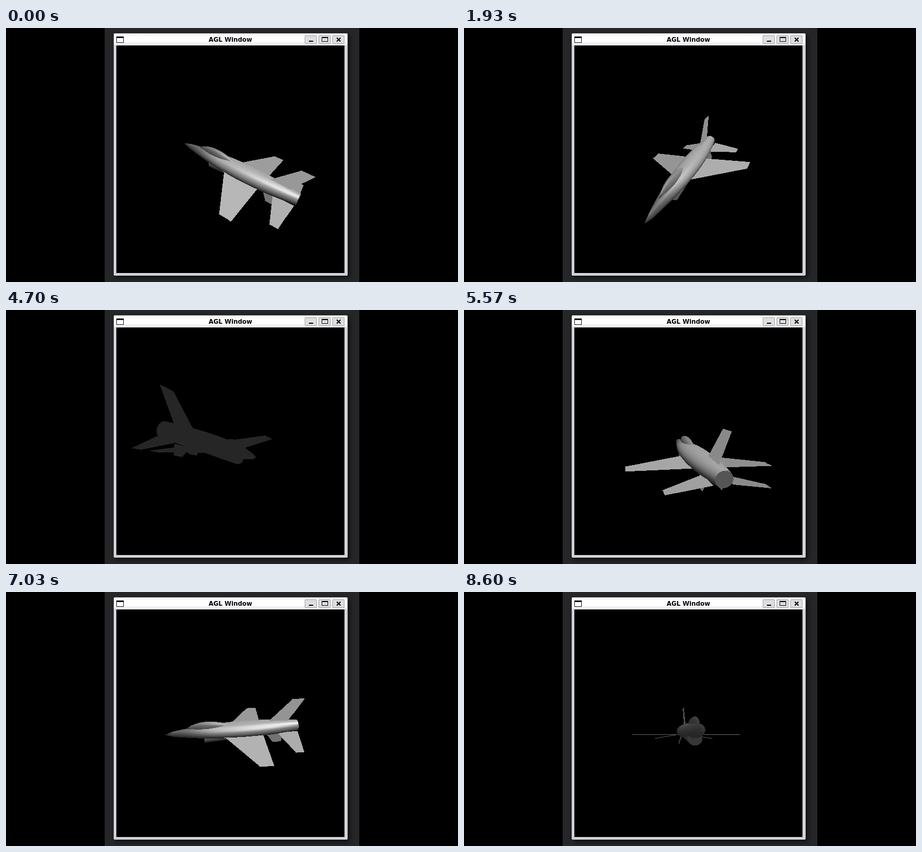
An HTML page with a canvas that plays this animation: 852 px wide and 480 px high, repeating every 8630 ms.

```html
<!DOCTYPE html>
<html lang="en">
<head>
<meta charset="utf-8">
<title>AGL Window</title>
<style>
  html, body { margin: 0; width: 100%; height: 100%; overflow: hidden; background: #000; }
  svg, canvas { position: absolute; display: block; }
  svg { left: 0; top: 0; }
  canvas { left: 208px; top: 33px; }
  text { font: bold 11.6px "DejaVu Sans", sans-serif; }
  .frame { filter: drop-shadow(4px 4px 4px rgba(0, 0, 0, .6)); }
</style>
</head>
<body>
<svg width="852" height="480" viewBox="0 0 852 480">
  <defs>
    <linearGradient id="bar" x1="0" y1="0" x2="0" y2="1">
      <stop offset="0" stop-color="#eeeef2"/>
      <stop offset=".25" stop-color="#fff"/>
      <stop offset=".65" stop-color="#fff"/>
      <stop offset="1" stop-color="#e2e2e8"/>
    </linearGradient>
    <g id="button">
      <rect x=".5" y=".5" width="22" height="15" rx="1.5" fill="#dedee0" stroke="#a2a2a6"/>
    </g>
  </defs>
  <rect x="186" width="480" height="480" fill="#262629"/>
  <rect class="frame" x="203" y="10" width="441" height="458" rx="2" fill="#d2d2d8"/>
  <rect x="204" y="11" width="439" height="22" rx="1" fill="url(#bar)"/>
  <rect x="208" y="33" width="430" height="430"/>
  <path d="M208 16h14v12h-14zM209 19v8h12v-8z" fill="#111" fill-rule="evenodd"/>
  <text x="423" y="26" text-anchor="middle">AGL Window</text>
  <use href="#button" x="563" y="14"/>
  <use href="#button" x="589" y="14"/>
  <use href="#button" x="615" y="14"/>
  <path d="M571 24h8v2h-8z"/>
  <path d="M595 17h12v9h-12zM596 19v6h10v-6z" fill-rule="evenodd"/>
  <path d="M623.5 18.5l7 7m0-7l-7 7" stroke="#000" stroke-width="2"/>
</svg>
<canvas id="view" width="430" height="430"></canvas>
<script>
const LOOP = 8630, SIZE = 430, MID = SIZE / 2, EYE = 400, SIDES = 20;
const ctx = document.getElementById('view').getContext('2d');
const image = ctx.createImageData(SIZE, SIZE);
const depth = new Float32Array(SIZE * SIZE);

// Key poses: time, heading in degrees, sideways lean, lean to the viewer
const POSES = [
  [0, -31, .13, .565],
  [1030, 11, -.17, .53],
  [1930, 60, -.19, .5],
  [3570, 172, -.07, -.545],
  [5570, 285, .04, .17],
  [7030, 361, -.06, .48],
  [8600, 457, 0, -.06]
];

const dot = (a, b) => a[0] * b[0] + a[1] * b[1] + a[2] * b[2];
const norm = v => { const l = Math.hypot(...v); return v.map(c => c / l); };
const smooth = (a, b, v) => {
  const t = Math.min(1, Math.max(0, (v - a) / (b - a)));
  return t * t * (3 - 2 * t);
};

const LIGHT = norm([.16, .78, .6]), HALF = norm([LIGHT[0], LIGHT[1], LIGHT[2] + 1]);

// Nose, left and up directions of the aircraft, and the light it receives
let F, P, U, gain, slide, zoom;

function slope(i, c) {
  const a = POSES[Math.max(0, i - 1)], b = POSES[Math.min(POSES.length - 1, i + 1)];
  return (b[c] - a[c]) / (b[0] - a[0]);
}

function poseAt(time) {
  let i = 0;
  while (i < POSES.length - 2 && time >= POSES[i + 1][0]) i++;
  const a = POSES[i], b = POSES[i + 1], span = b[0] - a[0];
  const t = Math.min(1, (time - a[0]) / span), t2 = t * t, t3 = t2 * t;
  return a.map((v, c) => (2 * t3 - 3 * t2 + 1) * v + (3 * t2 - 2 * t3) * b[c] +
    span * ((t3 - 2 * t2 + t) * slope(i, c) + (t3 - t2) * slope(i + 1, c)));
}

function setPose(time) {
  const [, turn, ux, uz] = poseAt(time);
  U = [ux, Math.sqrt(1 - ux * ux - uz * uz), uz];
  const tilt = v => {
    const m = dot(v, U) / (1 + U[1]);
    return [v[0] - m * U[0], v[1] - m * (1 + U[1]), v[2] - m * U[2]];
  };
  const a = turn * Math.PI / 180, c = Math.cos(a), s = Math.sin(a);
  F = tilt([-c, 0, s]);
  P = tilt([s, 0, c]);
  gain = smooth(-.2, .15, uz);
  slide = 30 * F[2];
  zoom = 1 + .12 * Math.max(0, -F[2]) ** 3;
}

const turned = p => [0, 1, 2].map(i => p[0] * F[i] + p[1] * P[i] + p[2] * U[i]);

function project([x, y, z], shade) {
  const w = turned([x + slide, y, z]), k = EYE / (EYE - w[2]);
  return [MID + w[0] * k * zoom, MID - 2 - w[1] * k * zoom, k, shade];
}

function lit(normal, tint) {
  const n = norm(turned(normal));
  const diffuse = Math.max(0, .25 + .75 * dot(n, LIGHT));
  const shine = Math.max(0, dot(n, HALF)) ** 30 * .6;
  return tint * (gain * diffuse * .85 + Math.sqrt(gain) * shine);
}

function plot(x, y, k, shade) {
  if (x < 0 || y < 0 || x >= SIZE || y >= SIZE) return;
  const at = y * SIZE + x;
  if (k <= depth[at]) return;
  depth[at] = k;
  image.data.fill(38 + 158 * shade, at * 4, at * 4 + 3);
  image.data[at * 4 + 3] = 255;
}

function triangle(a, b, c) {
  const area = (b[0] - a[0]) * (c[1] - a[1]) - (b[1] - a[1]) * (c[0] - a[0]);
  if (Math.abs(area) < 1e-6) return;
  const x0 = Math.floor(Math.min(a[0], b[0], c[0])), x1 = Math.ceil(Math.max(a[0], b[0], c[0]));
  const y0 = Math.floor(Math.min(a[1], b[1], c[1])), y1 = Math.ceil(Math.max(a[1], b[1], c[1]));
  for (let y = y0; y <= y1; y++) {
    for (let x = x0; x <= x1; x++) {
      const px = x + .5 - a[0], py = y + .5 - a[1];
      const v = (px * (c[1] - a[1]) - py * (c[0] - a[0])) / area;
      const w = (py * (b[0] - a[0]) - px * (b[1] - a[1])) / area;
      const u = 1 - v - w;
      if (u < 0 || v < 0 || w < 0) continue;
      plot(x, y, u * a[2] + v * b[2] + w * c[2], u * a[3] + v * b[3] + w * c[3]);
    }
  }
}

function line(a, b, shade) {
  const n = Math.ceil(Math.max(Math.abs(b[0] - a[0]), Math.abs(b[1] - a[1]), 1));
  for (let i = 0; i <= n; i++) {
    const [x, y, k] = [0, 1, 2].map(c => a[c] + (b[c] - a[c]) * i / n);
    plot(Math.floor(x), Math.floor(y), k, shade);
  }
}

const fan = pts => {
  for (let i = 2; i < pts.length; i++) triangle(pts[0], pts[i - 1], pts[i]);
};

// A round hull from x0 back to x1; shape(v) gives half width, half height and centre height
function hull(x0, x1, steps, shape, tintAt) {
  const rings = Array.from({ length: steps + 1 }, (_, i) => {
    const v = i / steps, [w, h, z] = shape(v);
    const before = Math.max(0, v - .05), after = Math.min(1, v + .05);
    const lean = (shape(after)[0] - shape(before)[0]) / ((after - before) * (x0 - x1));
    return Array.from({ length: SIDES }, (_, j) => {
      const q = j / SIDES * 2 * Math.PI, c = Math.cos(q), s = Math.sin(q);
      const size = Math.hypot(c * h, s * w) || 1;
      const shade = lit([lean, c * h / size, s * w / size], tintAt(v));
      return project([x0 + (x1 - x0) * v, w * c, z + h * s], shade);
    });
  });
  for (let i = 1; i <= steps; i++) {
    for (let j = 0; j < SIDES; j++) {
      const n = (j + 1) % SIDES;
      fan([rings[i - 1][j], rings[i - 1][n], rings[i][n], rings[i][j]]);
    }
  }
  for (const end of [rings[0], rings[steps]]) {
    fan(end.map(([x, y, k]) => [x, y, k, gain * .3]));
  }
}

// A flat surface from root to tip, each with x of the front edge, chord, y and z
function surface(root, tip, tint, upright) {
  const edge = ({ x, chord, y, z }) => [[x, y, z], [x - chord, y, z]];
  const pts = [...edge(root), ...edge(tip).reverse()];
  const w = turned(pts[3]);
  const above = upright || dot(U, [-w[0], -w[1], EYE - w[2]]) > 0;
  const shade = above ? gain * tint * Math.max(0, dot(U, LIGHT)) : 0;
  const corners = pts.map(p => project(p, shade));
  const rim = Math.max(shade, Math.sqrt(gain) * .8 * tint);
  fan(corners);
  corners.forEach((p, i) => i && line(corners[i - 1], p, rim));
}

function pair(root, tip, tint, upright) {
  for (const side of [1, -1]) {
    const flip = p => ({ ...p, y: p.y * side });
    surface(flip(root), flip(tip), side > 0 ? tint : tint * .82, upright);
  }
}

const bulge = v => Math.sin(Math.PI * v);

function draw(time) {
  setPose(time);
  image.data.fill(0);
  depth.fill(0);
  hull(127, -127, 16, v => {
    const r = Math.sin(2.6 * v);
    return [21 * r, 14 * Math.sqrt(r), 2 * v - 18];
  }, v => .5 + .5 * smooth(.1, .4, v));
  hull(85, -10, 10, v => [8 * bulge(v), 12 * bulge(v ** .8), -8], v => .65 + .2 * v);
  hull(52, -60, 4, v => [11, 10 - 2 * v, 7 * v - 30], () => .65);
  pair({ x: 55, chord: 75, y: 8, z: -20 }, { x: 13, chord: 33, y: 18, z: -22 }, .85);
  pair({ x: 13, chord: 72, y: 14, z: -23 }, { x: -40, chord: 21, y: 104, z: -23 }, .92);
  pair({ x: -87, chord: 38, y: 12, z: -23 }, { x: -107, chord: 14, y: 64, z: -32 }, .88);
  pair({ x: -68, chord: 30, y: 9, z: -28 }, { x: -78, chord: 16, y: 13, z: -42 }, .5, true);
  surface({ x: -70, chord: 38, y: 0, z: -6 }, { x: -114, chord: 22, y: 0, z: 38 }, .72, true);
  ctx.putImageData(image, 0, 0);
}

function tick() {
  draw(performance.now() % LOOP);
  requestAnimationFrame(tick);
}
tick();
</script>
</body>
</html>
```
